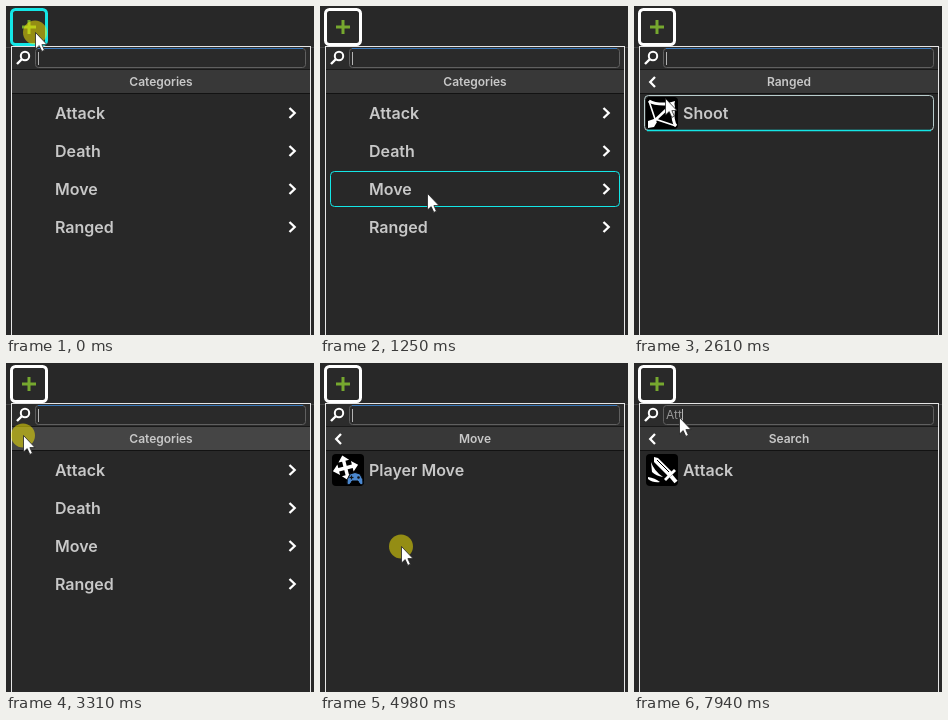
Animation of 308 by 329 pixels, one loop 8 s. Source, as an HTML page with a canvas:

```html
<!DOCTYPE html>
<html>
<head>
<meta charset="utf-8">
<style>
html, body { margin: 0; width: 100%; height: 100%; overflow: hidden; background: #282828; }
canvas { display: block; width: 308px; height: 329px; }
</style>
</head>
<body>
<canvas id="stage"></canvas>
<script>
const W = 308, H = 329, LOOP = 8000;
const canvas = document.getElementById('stage');
const ratio = window.devicePixelRatio || 1;
canvas.width = W * ratio;
canvas.height = H * ratio;
const c = canvas.getContext('2d');

const CYAN = '#14e6e6', TEXT = '#c8c8c8';
const CATEGORIES = ['Attack', 'Death', 'Move', 'Ranged'];

// Pages in order of start time; "typed" marks search results.
const pages = [
  { at: 0, title: 'Categories', rows: CATEGORIES, root: true },
  { at: 1690, title: 'Ranged', rows: ['Shoot'] },
  { at: 3310, title: 'Categories', rows: CATEGORIES, root: true },
  { at: 4980, title: 'Move', rows: ['Player Move'] },
  { at: 5810, title: 'Categories', rows: CATEGORIES, root: true },
  { at: 7270, title: 'Search', rows: ['Attack', 'Death', 'Player Move'], typed: 'A' },
  { at: 7810, title: 'Search', rows: ['Attack', 'Death'], typed: 'At' },
  { at: 7940, title: 'Search', rows: ['Attack'], typed: 'Att' }
];

// Pointer path: time, x, y
const path = [
  [0, 29, 26], [290, 29, 26], [1090, 104, 164], [1250, 107, 187], [1490, 105, 232],
  [1770, 105, 232], [2340, 161, 114], [2540, 161, 114], [2610, 31, 92], [2800, 10, 69],
  [2960, 17, 72], [3420, 17, 72], [3990, 74, 146], [4260, 74, 146], [4290, 75, 148],
  [4430, 75, 148], [4540, 81, 183], [5210, 81, 183], [5580, 16, 72], [5920, 16, 72],
  [6070, 21, 72], [6190, 45, 54], [LOOP, 45, 54]
];

// Click discs: start, end
const clicks = [[0, 70], [1690, 1790], [3310, 3410], [4980, 5080], [5810, 5910], [6440, 6540]];

function pointerAt(t) {
  const i = path.findIndex(p => p[0] > t);
  const [t0, x0, y0] = path[i - 1], [t1, x1, y1] = path[i];
  const u = (t - t0) / (t1 - t0), k = u * u * (3 - 2 * u);
  return { x: x0 + (x1 - x0) * k, y: y0 + (y1 - y0) * k };
}

function box(x, y, w, h, r, fill, stroke, width = 1) {
  c.beginPath();
  c.roundRect(x, y, w, h, r);
  if (fill) { c.fillStyle = fill; c.fill(); }
  if (stroke) { c.strokeStyle = stroke; c.lineWidth = width; c.stroke(); }
}

function rect(x, y, w, h, color) {
  c.fillStyle = color;
  c.fillRect(x, y, w, h);
}

function line(points, color, width) {
  c.beginPath();
  points.forEach(([x, y]) => c.lineTo(x, y));
  c.strokeStyle = color;
  c.lineWidth = width;
  c.stroke();
}

function shape(d, fill = '#fff', stroke, width) {
  const p = new Path2D(d);
  if (fill) { c.fillStyle = fill; c.fill(p); }
  if (stroke) { c.strokeStyle = stroke; c.lineWidth = width; c.stroke(p); }
}

function disc(x, y, r, color) {
  c.beginPath();
  c.arc(x, y, r, 0, Math.PI * 2);
  c.fillStyle = color;
  c.fill();
}

function label(text, x, y, font, color = TEXT, align = 'left') {
  c.font = font + ' Inter, sans-serif';
  c.textAlign = align;
  c.fillStyle = color;
  c.fillText(text, x, y);
}

// Each icon is drawn in a 32 px tile.
const icons = {
  Attack() {
    shape('M8 3L12 4L27 19L23 23L8 8Z');
    shape('M18 25L28 15L30 17L20 27Z');
    line([[25, 22], [30, 28]], '#fff', 4);
    shape('M5 8Q8 17 17 23Q10 22 6 18ZM2 23Q9 24 14 28Q7 29 2 25Z');
    line([[11, 6], [23, 18]], '#000', 1);
  },
  Death() {
    shape('M16 4C2 4 2 20 9 22V28H23V22C30 20 30 4 16 4Z');
    disc(11, 15, 3.2, '#000');
    disc(21, 15, 3.2, '#000');
    shape('M16 18L18 22H14ZM13 25H14V28H13ZM18 25H19V28H18Z', '#000');
  },
  Shoot() {
    shape('M3 4C13 10 25 5 27 8C29 12 24 21 30 29', null, '#fff', 3);
    shape('M3 4L9 22L30 29', null, '#fff', 1.6);
    line([[4, 28], [24, 9]], '#fff', 2.5);
    shape('M29 4L27 14L19 7ZM2 24L8 22L11 25L8 30L2 31Z');
  },
  'Player Move'() {
    c.save();
    c.translate(13.5, 14);
    c.rotate(-0.25);
    for (let i = 0; i < 4; i++) {
      shape('M-1.7 1V-7H-5.5L0 -13L5.5 -7H1.7V1Z');
      c.rotate(Math.PI / 2);
    }
    c.restore();
    shape('M18 20Q23 17 28 20Q32 26 31 30Q28 32 26 27H20Q18 32 15 30Q14 26 18 20Z',
      '#4b88cf', '#000', 1);
    line([[17.5, 23.5], [21.5, 23.5]], '#111', 1.2);
    line([[19.5, 21.5], [19.5, 25.5]], '#111', 1.2);
    disc(26.5, 23.5, 1.3, '#111');
  }
};

function drawWindow(mouse) {
  rect(0, 0, W, H, '#282828');
  rect(0, 41, W, 1, '#444');
  const overButton = mouse.x < 42 && mouse.y < 40;
  box(5.5, 3.5, 35, 35, 4, '#292929', overButton ? CYAN : '#fff', 3);
  rect(16, 19.5, 14, 3, '#76a82f');
  rect(21.5, 14, 3, 14, '#76a82f');
  rect(5, 40, 300, H, '#e6e6e6');
  rect(6, 41, 298, H, '#282828');
}

function drawSearch(typed) {
  rect(6, 41, 298, 22, '#2c2c2c');
  box(29.5, 42.5, 270, 19, 3, '#2a2a2a', '#606060');
  if (!typed) line([[32, 42.5], [297, 42.5]], '#3a79bb', 1);
  c.beginPath();
  c.arc(19, 50, 4.2, 0, Math.PI * 2);
  c.strokeStyle = '#fff';
  c.lineWidth = 2;
  c.stroke();
  line([[16, 53], [11, 58]], '#fff', 2.4);
  let caret = 32;
  if (typed) {
    label(typed, 32, 56, '12px', '#999');
    caret += c.measureText(typed).width;
  }
  rect(Math.round(caret), 46, 1, 13, '#b4b4b4');
}

function drawHeader(page, mouse) {
  const over = mouse.y >= 64 && mouse.y < 87;
  rect(6, 63, 298, 1, '#191919');
  rect(6, 64, 298, 23, over ? '#454545' : '#383838');
  rect(6, 87, 298, 1, '#121212');
  label(page.title, 155, 80, '600 12px', TEXT, 'center');
  if (!page.root) line([[21, 71], [16.2, 76], [21, 81]], '#fff', 2.3);
}

function drawRows(page, mouse) {
  page.rows.forEach((name, i) => {
    const y = 89 + 38 * i;
    if (page.root) {
      line([[283.5, y + 13], [288.7, y + 18], [283.5, y + 23]], '#fff', 2.3);
      if (mouse.y >= y - 1 && mouse.y < y + 37) box(10.5, y + 0.5, 289, 35, 4, null, CYAN);
    } else {
      c.save();
      c.translate(12, y + 2);
      box(0, 0, 32, 32, 4, '#000');
      icons[name]();
      c.restore();
      // The outline stays on while the pointer goes up to the back button.
      if (!page.typed && mouse.y < y + 37) {
        box(10.5, y + 0.5, 289, 35, 4, null, '#b8cccc');
        line([[13, y + 35.5], [297, y + 35.5]], CYAN, 1.4);
      }
    }
    label(name, 49, y + 24, '600 16px');
  });
}

function drawPointer(t, { x, y }) {
  if (clicks.some(([from, to]) => t >= from && t < to)) disc(x, y + 0.5, 12, 'rgba(255,242,0,.5)');
  c.save();
  c.translate(x, y);
  shape('M.5 .5V17L4.2 13.6L6.8 19.4L9.4 18.2L6.9 12.6H12Z', '#fff', '#222', 0.8);
  c.restore();
}

function draw(t) {
  const mouse = pointerAt(t);
  const page = pages.filter(p => p.at <= t).pop();
  c.setTransform(ratio, 0, 0, ratio, 0, 0);
  drawWindow(mouse);
  drawSearch(page.typed);
  drawHeader(page, mouse);
  drawRows(page, mouse);
  drawPointer(t, mouse);
}

const start = performance.now();
function frame() {
  draw((performance.now() - start) % LOOP);
  requestAnimationFrame(frame);
}
frame();
</script>
</body>
</html>
```
